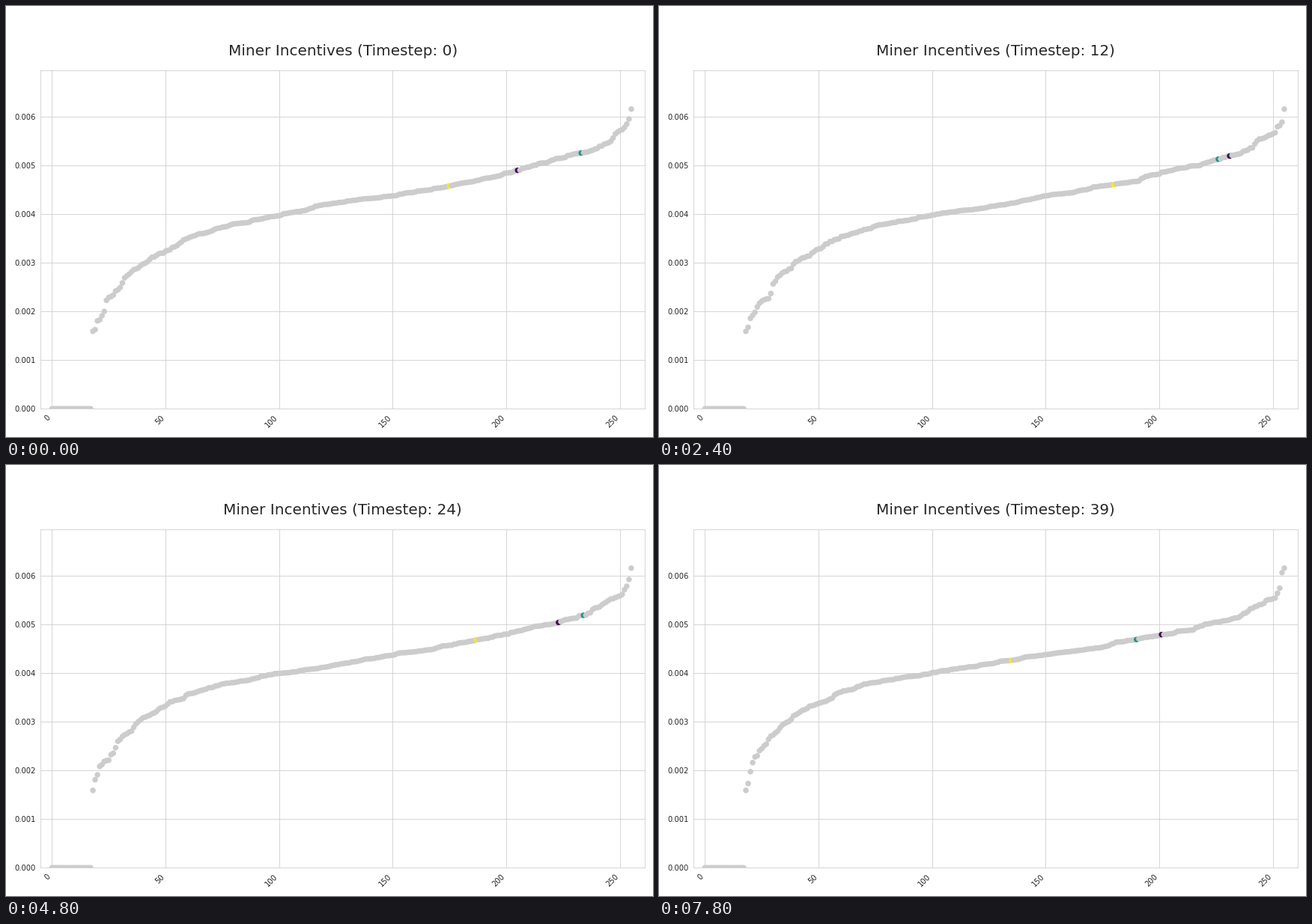
Recreate the animation shown at these times as a matplotlib script. Size 864x576 px, loop 8000 ms.

```python
import numpy as np
import matplotlib.pyplot as plt
from matplotlib.animation import FuncAnimation

W, H, DPI = 864, 576, 72
FRAMES, STEP_MS = 40, 200
N, IDLE, MEDIAN = 256, 18, 430
GRAY, INK = "#cccccc", "#262626"

plt.rcParams["font.family"] = "DejaVu Sans"

# Average sorted curve: rank and incentive (in 1e-5)
RANKS = np.array([18, 20, 23, 30, 40, 50, 60, 75, 100, 165, 200, 235,
                  251, 253, 255])
LEVELS = np.array([159, 189, 215, 261, 306, 331, 356, 377, 399, 448, 481,
                   521, 564, 580, 616])

# Ranks of the highlighted miners at a few timesteps
KEYS = [0, 8, 16, 24, 29, 33, 39]
MINERS = {
    "#fde725": [175, 182, 179, 187, 170, 156, 135],
    "#440154": [205, 237, 225, 223, 226, 214, 201],
    "#21918c": [233, 216, 236, 234, 229, 213, 190],
}


def incentives(step):
    """Curve that slowly flattens, with uneven gaps between ranks."""
    rng = np.random.default_rng(100 + step)
    edge = np.minimum(RANKS - IDLE, N - 1 - RANKS)
    pull = 0.14 * (0.5 - step / (FRAMES - 1)) * np.clip(edge / 4, 0, 1)
    knots = LEVELS + pull * (LEVELS - MEDIAN)
    y = np.zeros(N)
    y[IDLE] = knots[0]
    for a, b, lo, hi in zip(RANKS, RANKS[1:], knots, knots[1:]):
        gaps = rng.gamma(2, size=b - a)
        y[a + 1:b + 1] = lo + (hi - lo) * np.cumsum(gaps) / gaps.sum()
    return y * 1e-5


def colors(step):
    out = [GRAY] * N
    for color, ranks in MINERS.items():
        i = round(np.interp(step, KEYS, ranks))
        while out[i] != GRAY:
            i += 1
        out[i] = color
    return out


fig = plt.figure(figsize=(W / DPI, H / DPI), dpi=DPI, facecolor="white")
left, right, top, bottom = 46.25, 853.2, 86.3, 538.2
ax = fig.add_axes([left / W, 1 - bottom / H,
                   (right - left) / W, (bottom - top) / H])
ax.set_xlim(-5, N + 5)
ax.set_ylim(0, (bottom - top) / 65 * 1e-3)
ax.set_xticks(range(0, 251, 50))
ax.set_yticks(np.arange(7) * 1e-3)
ax.yaxis.set_major_formatter("{x:.3f}")
ax.set_axisbelow(True)
ax.grid(color=GRAY, linewidth=0.8)
ax.tick_params(length=0, pad=7, labelsize=10, labelcolor=INK)
plt.setp(ax.get_xticklabels(), rotation=45, ha="right")
for spine in ax.spines.values():
    spine.set(color=GRAY, linewidth=0.8)

title = ax.set_title("", fontsize=20, pad=20, color=INK)
x = np.arange(N)
dots = ax.scatter(x, np.zeros(N), s=36, c=[GRAY] * N, linewidths=1.5)


def update(step):
    dots.set_offsets(np.column_stack([x, incentives(step)]))
    dots.set_facecolors(colors(step))
    title.set_text(f"Miner Incentives (Timestep: {step})")
    return dots, title


anim = FuncAnimation(fig, update, frames=FRAMES, interval=STEP_MS,
                     init_func=lambda: update(0), repeat=True)
plt.show()
```
